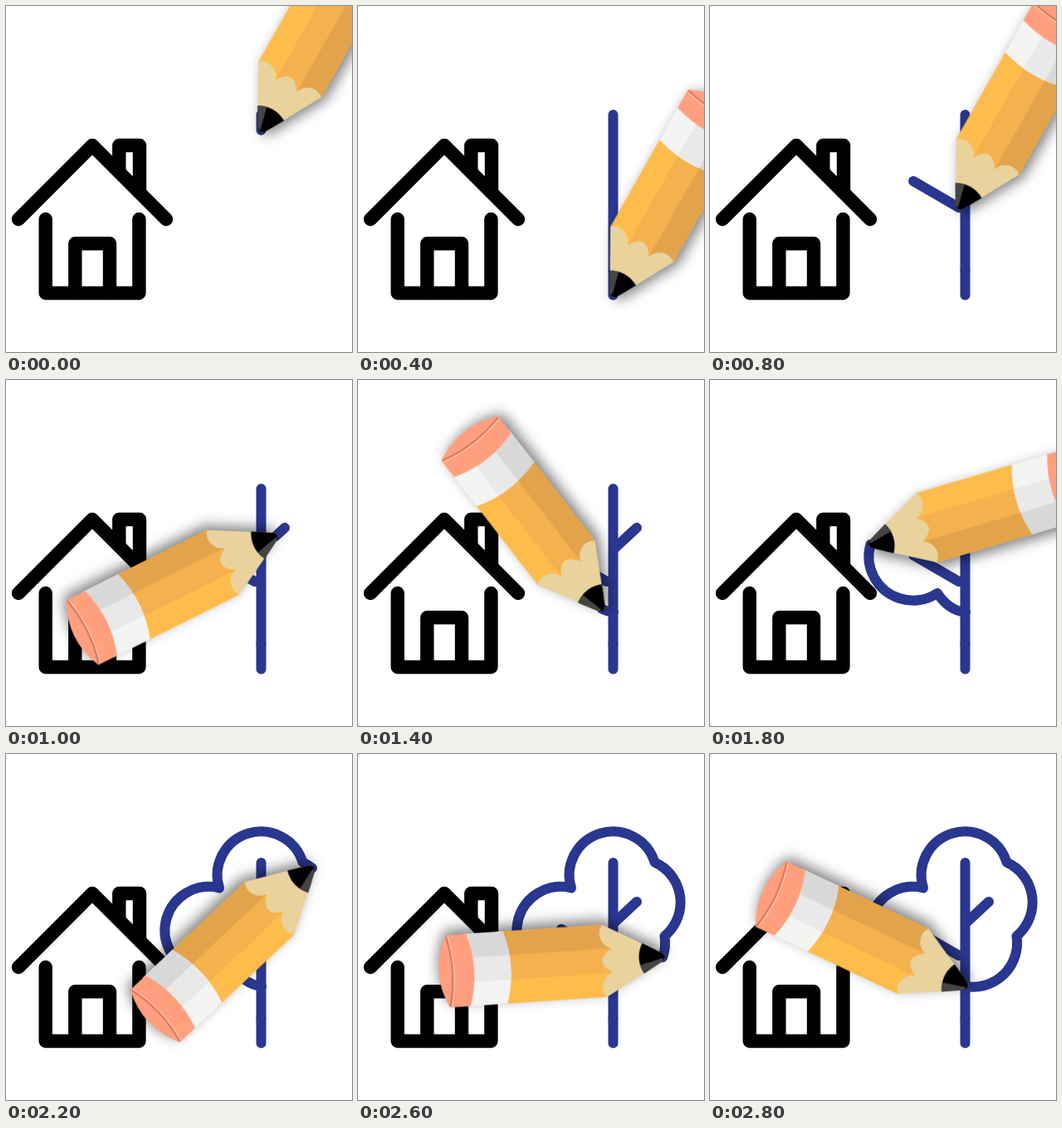
An HTML page for the animation above (4800 ms loop, 417 by 417 pixels).

```html
<!DOCTYPE html>
<html lang="en">
<head>
<meta charset="utf-8">
<title>Pencil drawing a tree</title>
<style>
  html, body { margin: 0; height: 100%; overflow: hidden; background: #fff; }
  svg { display: block; width: 100vw; height: 100vh; }
  .line { fill: none; stroke-linecap: round; stroke-linejoin: round; }
</style>
</head>
<body>
<svg viewBox="0 0 417 417">
  <defs>
    <filter id="shadow" filterUnits="userSpaceOnUse" x="-50" y="-100" width="380" height="200" color-interpolation-filters="sRGB">
      <feDropShadow dx="0" dy="6" stdDeviation="8" flood-color="#000" flood-opacity=".5"/>
    </filter>
  </defs>

  <g class="line" stroke="#000" stroke-width="16.4">
    <path d="M15 257L104 168L193 257"/>
    <path d="M47.7 257V346H160.4V257"/>
    <path d="M83.3 346V286.3H125V346"/>
    <path d="M136.3 200V168H161V225"/>
  </g>

  <g id="tree" class="line" stroke="#2a3790" stroke-width="12"></g>

  <!-- The pencil lies along +x with its tip at the origin. -->
  <g id="pencil">
    <g filter="url(#shadow)" transform="scale(1.01)">
      <path fill="#fdbc4b" d="M73-43L62-14.5V14.5L73 43H200V-43z"/>
      <path fill="#f5b14d" d="M62-14.5V14.5L73 43H200V-14.5z"/>
      <path fill="#e2a34b" d="M62 14.5L73 43H200V14.5z"/>
      <path fill="#ead29c" d="M73-43C82-34 76-17 64-14.5Q88 0 64 14.5C76 17 82 34 73 43L4 5Q-2 0 4-5z"/>
      <path fill="#000" d="M27-18Q37 0 27 18L4 5Q-2 0 4-5z"/>
      <path fill="#444" d="M27-18Q30-13 31-8L3-1L4-5z"/>
      <path fill="#f4f4f3" d="M192-43Q178 0 192 43H240V-43z"/>
      <path fill="#e9e9e9" d="M186-14.5Q183 10 192 43H240V-14.5z"/>
      <path fill="#d8d8d8" d="M186 14.5Q188 32 192 43H240V14.5z"/>
      <path fill="#ff9f7e" d="M236-43Q222 0 236 43H261Q282 0 261-43z"/>
      <path class="line" stroke="#ffc0a8" stroke-width="1.5" d="M258-41Q248 0 258 41"/>
      <path class="line" stroke="#d0735a" stroke-width="1.8" d="M260-41Q250 0 260 41"/>
    </g>
  </g>
</svg>
<script>
  const STEP = 200, LOOP = 4800, LEAD = 3.5;

  // Each stroke grows evenly from `from` to its full length while the pencil turns from `turn[0]` to `turn[1]`.
  const strokes = [
    { d: "M307.5 131V319", steps: 2, from: .1, turn: [-60.5, -60.5] },
    { d: "M307.5 319V348.5", steps: 1, from: 1, turn: [-60.5, -60.5] },
    { d: "M245 211L300 243", steps: 2, from: 0, turn: [8, -60.5] },
    { d: "M336 178L308 204", steps: 2, from: .4, turn: [153.5, 205] },
    { d: "M308 280Q288 278 274 257A53 53 0 0 1 228 263", steps: 2, from: .16, turn: [-127.8, -127.8] },
    { d: "M228 263A53 53 0 0 1 193.5 198", steps: 1, from: 1, turn: [-16.5, -16.5] },
    { d: "M193.5 198A53 53 0 0 1 257 161.5A52.4 52.4 0 0 1 357.5 130.5A53 53 0 0 1 369 137.5", steps: 2, from: .61, turn: [80, 136.7] },
    { d: "M369 137.5A53 53 0 0 1 369.5 219.5A53 53 0 0 1 308.5 280", steps: 3, from: .23, turn: [147, 205.3] }
  ];

  const tree = document.getElementById("tree");
  const pencil = document.getElementById("pencil");
  const lerp = (a, b, u) => a + (b - a) * u;

  for (const stroke of strokes) {
    stroke.path = document.createElementNS(tree.namespaceURI, "path");
    stroke.path.setAttribute("d", stroke.d);
    tree.append(stroke.path);
    stroke.length = stroke.path.getTotalLength();
  }

  const poses = strokes.flatMap(({ steps, from, turn }, current) =>
    Array.from({ length: steps }, (_, i) => {
      const u = steps > 1 ? i / (steps - 1) : 1;
      return { current, part: lerp(from, 1, u), angle: lerp(...turn, u) };
    }));

  function draw(time) {
    const step = Math.min(Math.floor(time % LOOP / STEP), poses.length - 1);
    const { current, part, angle } = poses[step];
    strokes.forEach(({ path, length }, i) => {
      path.style.display = i > current ? "none" : "";
      path.style.strokeDasharray = i === current && part < 1 ? `${part * length} ${length * 2}` : "none";
    });
    const { path, length } = strokes[current];
    const end = path.getPointAtLength(part * length);
    pencil.setAttribute("transform", `translate(${end.x} ${end.y}) rotate(${angle}) translate(${-LEAD} 0)`);
  }

  function tick() {
    draw(performance.now());
    requestAnimationFrame(tick);
  }
  tick();
</script>
</body>
</html>
```
